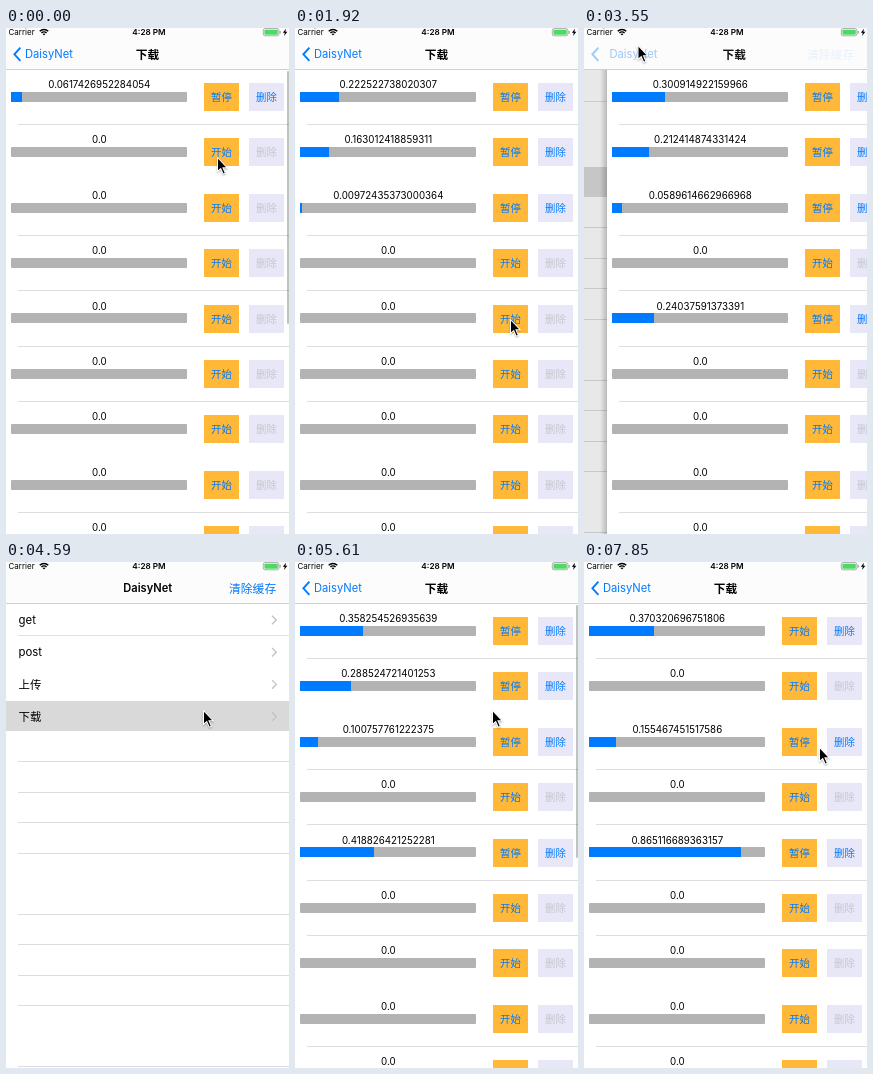
Animation, 283 px wide and 506 px high, one loop 7.99 s. Source, as an HTML page with a canvas:

```html
<!DOCTYPE html>
<html lang="zh-CN">
<head>
<meta charset="utf-8">
<title>下载</title>
<style>
html, body { margin: 0; width: 100%; height: 100%; overflow: hidden; background: #fff; }
canvas { display: block; width: 283px; height: 506px; }
</style>
</head>
<body>
<canvas id="stage"></canvas>
<script>
const W = 283, H = 506, LOOP = 7990, STEP = 148, LAST = 53;
const BLUE = '#007aff', NAV_BOTTOM = 41, PITCH = 55.4;
const POP_START = 3526, PUSH_START = 4677;
const FONT = 'Inter, "Noto Sans CJK SC", "Noto Sans CJK", sans-serif';

const canvas = document.getElementById('stage');
const dpr = window.devicePixelRatio || 1;
canvas.width = Math.round(W * dpr);
canvas.height = Math.round(H * dpr);
const ctx = canvas.getContext('2d');

// Each download grows from 0 at its first step through the values at the shared marks.
const MARKS = [0, 13, 24, 34, 43, LAST];
const downloads = {
  0: { from: -5, pause: 45, values: [0.0617426952284054, 0.222522738020307, 0.300914922159966,
                                     0.352221442027556, 0.370320696751806] },
  1: { from: 1, remove: 51, values: [0.163012418859311, 0.212414874331424, 0.267539292007601,
                                     0.330495580188556, 0.384520451830264] },
  2: { from: 11, values: [0.00972435373000364, 0.0589614662966968, 0.0942475836745254,
                          0.113778116318073, 0.155467451517586] },
  4: { from: 14, values: [0.24037591373391, 0.37411455465916, 0.508250154438522, 0.865116689363157] }
};

// Places the pointer visits, with the step of arrival; every trip takes TRAVEL steps.
const TRAVEL = 4;
const visits = [
  { at: 0, x: 211, y: 129 },
  { at: 9, x: 215, y: 182 },
  { at: 13, x: 215, y: 291 },
  { at: 22, x: 53.5, y: 17 },
  { at: 29, x: 197, y: 148 },
  { at: 44.6, x: 229, y: 70 },
  { at: 49, x: 256, y: 124 },
  { at: LAST, x: 235, y: 185 }
];

const clamp = v => Math.max(0, Math.min(1, v));
const mix = (a, b, k) => k === 1 ? b : a + (b - a) * k;
const smooth = k => k * k * (3 - 2 * k);

// Critically damped spring, 0 to 1.
function spring(ms) {
  const x = Math.max(0, ms) * 0.018;
  return 1 - Math.exp(-x) * (1 + x);
}

function pointerAt(n) {
  let { x, y } = visits[0];
  for (const v of visits.slice(1)) {
    const k = smooth(clamp((n - v.at) / TRAVEL + 1));
    x = mix(x, v.x, k);
    y = mix(y, v.y, k);
  }
  return { x, y };
}

function progress({ from, values }, n) {
  const marks = MARKS.filter(m => m > from);
  let value = 0;
  values.forEach((v, i) => {
    const begin = i ? marks[i - 1] : from;
    value = mix(value, v, clamp((n - begin) / (marks[i] - begin)));
  });
  return value;
}

function rowState(i, n) {
  const d = downloads[i];
  if (!d || n < d.from || n >= d.remove) return { value: 0, running: false, active: false };
  return { value: progress(d, n), running: !(n >= d.pause), active: true };
}

function text(str, x, y, size, { color = '#000', weight = 400, align = 'left', alpha = 1 } = {}) {
  const cjk = str.charCodeAt(0) > 0x2000;
  ctx.save();
  ctx.globalAlpha *= clamp(alpha);
  ctx.font = `${weight} ${size}px ${FONT}`;
  ctx.textAlign = align;
  ctx.fillStyle = color;
  ctx.fillText(str, x, y + size * (cjk ? 0.38 : 0.364));
  ctx.restore();
}

function rect(x, y, w, h, color) {
  ctx.fillStyle = color;
  ctx.fillRect(x, y, w, h);
}

function round(x, y, w, h, r, color) {
  ctx.fillStyle = color;
  ctx.beginPath();
  ctx.roundRect(x, y, w, h, r);
  ctx.fill();
}

function polygon(points, color) {
  ctx.fillStyle = color;
  ctx.beginPath();
  points.forEach(([x, y]) => ctx.lineTo(x, y));
  ctx.closePath();
  ctx.fill();
}

function chevron(x, y, w, h, color, width) {
  ctx.strokeStyle = color;
  ctx.lineWidth = width;
  ctx.beginPath();
  ctx.moveTo(x, y - h);
  ctx.lineTo(x + w, y);
  ctx.lineTo(x, y + h);
  ctx.stroke();
}

function button(x, y, label, back, color) {
  rect(x, y, 35, 28, back);
  text(label, x + 17.5, y + 14.3, 10.4, { color, align: 'center' });
}

function downloadRow(i, n) {
  const { value, running, active } = rowState(i, n);
  const y = i * PITCH;
  const barY = Math.round(y + 63.8), buttonY = Math.round(y + 55);
  const label = value ? String(+value.toPrecision(15)) : '0.0';
  text(label, 93.3, y + 56.4, 9.75, { align: 'center' });
  round(5, barY, 176, 10, 1, '#b3b3b3');
  rect(5, barY, Math.round(176 * value), 10, BLUE);
  button(198, buttonY, running ? '暂停' : '开始', '#ffb838', BLUE);
  button(243, buttonY, '删除', '#e8e7f8', active ? BLUE : '#c6c6cc');
  if (i % 5 !== 1) rect(12, Math.floor(y + 96.7), W - 12, 1, '#dedee0');
}

function downloadPage(x, n) {
  ctx.save();
  ctx.translate(x, 0);
  if (x > 0) {
    const shade = ctx.createLinearGradient(-7, 0, 0, 0);
    shade.addColorStop(0, 'rgba(0,0,0,0)');
    shade.addColorStop(1, 'rgba(0,0,0,0.2)');
    rect(-7, NAV_BOTTOM, 7, H, shade);
  }
  rect(0, NAV_BOTTOM, W, H, '#fff');
  for (let i = 0; i < 9; i++) downloadRow(i, n);
  const indicator = n < 35 ? clamp(1 - n / 3) : clamp((47 - n) / 3);
  round(281, 43, 2, 253, 1, `rgba(0,0,0,${0.24 * indicator})`);
  ctx.restore();
}

function listPage(q) {
  ctx.save();
  ctx.translate(Math.round(-0.3 * W * (1 - q)), 0);
  rect(0, NAV_BOTTOM, W * 1.3, H, '#fff');
  rect(0, 139, W, 30, '#d9d9d9');
  rect(12, 73, W, 1, '#e0e0e2');
  for (let k = 1; k <= 11; k++) {
    if (k % 5) rect(12, Math.floor(169 + k * 30.5), W, 1, '#dcdce0');
  }
  ['get', 'post', '上传', '下载'].forEach((name, i) => {
    const y = 58 + i * 32.2;
    text(name, 12.5, y, 11.4);
    chevron(266, y, 4.3, 4.3, '#c0c0c5', 1.3);
  });
  ctx.restore();
  rect(0, NAV_BOTTOM, W, H, `rgba(0,0,0,${0.1 * (1 - q)})`);
}

function statusBar() {
  text('Carrier', 2.5, 4.5, 8);
  text('4:28 PM', 143, 4.5, 8.2, { weight: 600, align: 'center' });
  ctx.strokeStyle = '#000';
  ctx.lineWidth = 1.5;
  for (const r of [1.2, 3.6, 6]) {
    ctx.beginPath();
    ctx.arc(38, 7.5, r, -Math.PI * 0.75, -Math.PI * 0.25);
    ctx.stroke();
  }
  ctx.strokeStyle = '#8c8c8c';
  ctx.lineWidth = 0.7;
  ctx.beginPath();
  ctx.roundRect(257.3, 0.6, 15.6, 7.2, 1.8);
  ctx.stroke();
  round(258.4, 1.7, 13.4, 5, 1, '#4cd964');
  rect(273.6, 3, 1, 2.6, '#8c8c8c');
  polygon([[280, 0.8], [276.8, 4.8], [278.8, 4.8], [278, 8], [281.4, 3.7], [279.4, 3.7]], '#000');
}

// q: 0 shows the download bar, 1 the list bar.
function navBar(q, pressed) {
  const y = 26.1;
  const back = (1 - q) * (pressed ? 0.42 : 1);
  rect(0, 0, W, NAV_BOTTOM, '#fcfcfc');
  rect(0, NAV_BOTTOM, W, 1, '#d0d0d2');
  ctx.save();
  ctx.globalAlpha = back;
  chevron(14.4, y + 0.2, -6, 6.6, BLUE, 1.9);
  ctx.restore();
  text('DaisyNet', 19 + 80 * q, y, 11.2, { color: BLUE, alpha: back });
  text('DaisyNet', 43 + 98.7 * q, y, 11.1, { weight: 600, align: 'center', alpha: q * q });
  text('下载', 141.5 + 108 * q, y, 11.7, { weight: 700, align: 'center', alpha: 1 - q });
  text('清除缓存', 223, y, 11.8, { color: BLUE, alpha: q });
}

function cursor({ x, y }) {
  ctx.save();
  ctx.translate(x, y);
  ctx.shadowColor = 'rgba(0,0,0,0.3)';
  ctx.shadowBlur = 2 * dpr;
  ctx.shadowOffsetY = dpr;
  polygon([[0, -0.5], [0, 15.6], [3.5, 12.4], [6, 17.8], [9, 16.5], [6.7, 11.3], [11.4, 11.2]], '#fff');
  ctx.shadowColor = 'transparent';
  polygon([[1, 1.8], [1, 13.3], [3.9, 10.7], [6.5, 16.4], [7.7, 15.9], [5.2, 10.3], [9.1, 10.2]], '#000');
  ctx.restore();
}

function draw(time) {
  const n = Math.min(LAST, Math.floor((time % LOOP + 12) / STEP));
  const now = n * STEP;
  const q = spring(now - POP_START) - spring(now - PUSH_START);
  const x = Math.round(q * W);
  ctx.setTransform(dpr, 0, 0, dpr, 0, 0);
  rect(0, 0, W, H, '#fff');
  if (x > 0) listPage(q);
  if (x < W) downloadPage(x, n);
  navBar(q, now >= POP_START && now < PUSH_START);
  statusBar();
  cursor(pointerAt(n));
}

const start = performance.now();
function tick() {
  draw(performance.now() - start);
  requestAnimationFrame(tick);
}
tick();
</script>
</body>
</html>
```
